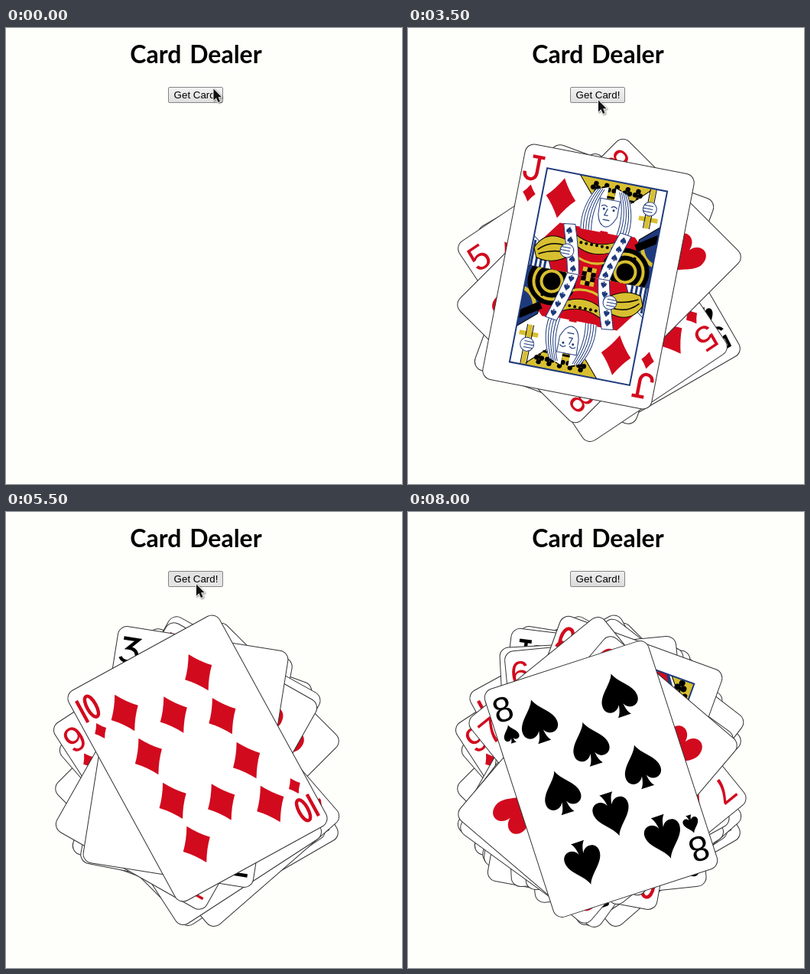
Write an HTML page with a canvas that moves like this. It is 518 by 596 pixels and loops after 8.8 s.

```html
<!DOCTYPE html>
<html lang="en">
<head>
<meta charset="utf-8">
<title>Card Dealer</title>
<style>
html, body { margin: 0; width: 100%; height: 100%; overflow: hidden; background: #fefefa; }
canvas { display: block; }
</style>
</head>
<body>
<canvas id="stage" width="518" height="596"></canvas>
<script>
const ctx = document.getElementById('stage').getContext('2d');
const LOOP = 8800, STEP = 100;
const CARD_W = 226, CARD_H = 314;
const RED = '#d20a1e', BLACK = '#000', GOLD = '#d8bf30', NAVY = '#1f3a7c', WHITE = '#fff';

// time, rank, suit, centre x, centre y, degrees
const deals = [
  [1300, '5', 'S', 263, 344, -30],
  [2200, '9', 'C', 243.5, 335, 20.2],
  [2800, '5', 'D', 241.5, 352.5, -33.8],
  [3300, '8', 'H', 250, 330.5, 45],
  [3500, 'J', 'D', 236, 325, 11],
  [3800, '4', 'D', 253, 354.5, -41],
  [4000, 'Q', 'S', 241, 324, 29],
  [4400, '9', 'D', 237.5, 351.5, -33],
  [4700, '7', 'H', 236, 332, 29.5],
  [5000, '3', 'S', 235, 320, 9],
  [5300, '10', 'D', 250.5, 322, -28.7],
  [5600, 'J', 'C', 229, 320, 7],
  [5900, 'Q', 'C', 263, 344, -6],
  [6000, 'Q', 'H', 241.5, 347, 10.5],
  [6200, 'K', 'H', 259, 328, 37.6],
  [6600, '7', 'C', 240, 328, -3],
  [6700, '6', 'D', 252.5, 328, -5.5],
  [6800, '4', 'S', 247, 354.5, 36],
  [7000, 'Q', 'D', 255, 318.5, 20],
  [7200, '7', 'D', 261, 325, -39],
  [7500, '6', 'H', 248, 350, 40.4],
  [8000, '8', 'S', 252.5, 349, -18]
];

// time, tip x, tip y
const pointer = [
  [0, 271, 79], [400, 272, 83], [600, 284, 104], [700, 298, 131],
  [800, 288, 118], [900, 263, 96], [1600, 248.5, 94],
  [6700, 226, 76], [6800, 168, 42], [6900, 112, 19], [7000, 81, 7]
];
const POINTER_GONE = 7100;
const clicks = [[1200, 1300], [3200, 4000], [4200, 5000], [5100, 5700], [5900, 6300]];

const suits = {
  S: new Path2D('M0-29C4-16 24-6 24 9C24 22 8 24 3 13C4 21 6 26 9 29H-9C-6 26-4 21-3 13C-8 24-24 22-24 9C-24-6-4-16 0-29Z'),
  H: new Path2D('M0 28C-4 14-25 2-25-12C-25-32-3-32 0-14C3-32 25-32 25-12C25 2 4 14 0 28Z'),
  D: new Path2D('M0-27Q9-11 20 0Q9 11 0 27Q-9 11-20 0Q-9-11 0-27Z'),
  C: clubPath()
};
const letters = {
  3: 'M-10-15H9L-2-3C14-4 14 16-1 15Q-8 15-11 10',
  10: 'M-9-16V16M5-15C13-15 13 15 5 15C-3 15-3-15 5-15',
  J: 'M-4-15H12M5-15V6C5 18-11 18-11 6',
  Q: 'M0-15C10-15 10 14 0 14C-10 14-10-15 0-15M-9 13Q-6 0 1 8T10 14',
  K: 'M-8-15V15M-13-15H-3M-13 15H-3M9-15L-8 4M-3-1L9 15M4-15H13M4 15H13'
};
for (const k in letters) letters[k] = new Path2D(letters[k]);

// pip heights: both side columns, then the middle column
const sides = { 4: [98], 5: [98], 6: [98, 0], 7: [98, 0], 8: [98, 0], 9: [98, 33], 10: [98, 33] };
const middle = { 3: [-98, 0, 98], 5: [0], 7: [-49], 8: [-49, 49], 9: [-3], 10: [-65, 65] };

function clubPath() {
  const p = new Path2D('M0-6C1 12 4 24 8 29H-8C-4 24-1 12 0-6Z');
  for (const [x, y] of [[0, -15], [-14, 7], [14, 7]]) {
    p.moveTo(x + 13.5, y);
    p.arc(x, y, 13.5, 0, 7);
  }
  return p;
}

function place(x, y, angle, scale, draw) {
  ctx.save();
  ctx.translate(x, y);
  ctx.rotate(angle);
  ctx.scale(scale, scale);
  draw();
  ctx.restore();
}

const bothWays = draw => [0, Math.PI].forEach(a => place(0, 0, a, 1, draw));
const ink = suit => 'HD'.includes(suit) ? RED : BLACK;
const isCourt = rank => 'JQK'.includes(rank);

function pip(suit, x, y, scale = 1, color = ink(suit)) {
  place(x, y, y > 0 ? Math.PI : 0, scale, () => {
    ctx.fillStyle = color;
    ctx.fill(suits[suit]);
  });
}

function shape(color, d, edge) {
  const p = new Path2D(d);
  ctx.fillStyle = color;
  ctx.fill(p);
  if (edge) { ctx.strokeStyle = edge; ctx.lineWidth = 1; ctx.stroke(p); }
}

function line(color, width, d) {
  ctx.strokeStyle = color;
  ctx.lineWidth = width;
  ctx.stroke(new Path2D(d));
}

function dot(color, x, y, r, edge) {
  ctx.beginPath();
  ctx.arc(x, y, r, 0, 7);
  ctx.fillStyle = color;
  ctx.fill();
  if (edge) { ctx.strokeStyle = edge; ctx.lineWidth = 1; ctx.stroke(); }
}

function rings(x, y, r, ...colors) {
  colors.forEach((c, i) => dot(c, x, y, r - i * 5, BLACK));
}

function dots(color, r, n, x, y, dx, dy) {
  for (let i = 0; i < n; i++) dot(color, x + i * dx, y + i * dy, r);
}

function face(x, y) {
  shape(WHITE, `M${x - 13} ${y - 16}H${x + 13}V${y + 5}Q${x + 7} ${y + 20} ${x} ${y + 20}Q${x - 9} ${y + 19} ${x - 12} ${y + 5}Z`, NAVY);
  line(NAVY, 1.2, `M${x - 10} ${y - 6}q4-4 8 0M${x + 3} ${y - 6}q4-4 8 0M${x - 1} ${y - 4}l-3 9h5M${x - 5} ${y + 11}h9`);
  dot(NAVY, x - 6, y - 3, 1.5);
  dot(NAVY, x + 7, y - 3, 1.5);
}

function hair(x, y, side) {
  shape(WHITE, `M${x} ${y - 32}L${x + side * 16} ${y - 26}Q${x + side * 34} ${y} ${x + side * 27} ${y + 28}H${x}Z`);
  for (let i = 0; i < 5; i++) {
    const d = side * (12 + i * 3.5);
    line(NAVY, 1, `M${x + side * (5 + i * 2.5)} ${y - 28}Q${x + d + side * 5} ${y} ${x + d} ${y + 28}`);
  }
}

function flower(x, y, core) {
  line(BLACK, 2.5, `M${x} ${y}Q${x + 4} ${y + 18} ${x + 4} ${y + 34}`);
  for (let a = 0; a < 4; a++)
    dot(GOLD, x + 7 * Math.cos(a * 1.57 + .8), y + 7 * Math.sin(a * 1.57 + .8), 6, BLACK);
  dot(core, x, y, 4, BLACK);
}

function hand(x, y) {
  dot(WHITE, x, y, 9, NAVY);
  line(NAVY, 1, `M${x - 8} ${y - 4}h12m-13 4h13m-12 4h12`);
}

function darkQueen() {
  shape(NAVY, 'M-81 0V-22L-15-65L20-75L62-58L81-30V0Z');
  shape(RED, 'M-30-50L5-78L18-12L34-10L62-62L74-34L81 0H-12Z', BLACK);
  line(WHITE, 2.5, 'M-10-60q-12 10 0 17t2 17t9 14M62-52q-12 8-3 16t-8 20M4-66q-8 8 0 16t2 16');
  shape(GOLD, 'M8-80L30-62L58-74L62-28L28-12Z', BLACK);
  line(BLACK, 2.5, 'M14-72L34-22L58-66M20-64L35-36L52-58M28-56H45');
  dots(BLACK, 1.5, 6, 17, -52, 3, 6);
  shape(GOLD, 'M-28-130H26L12-90L-28-108Z', BLACK);
  pip('C', -6, -120, .26, BLACK);
  pip('C', 10, -111, .26, BLACK);
  shape(BLACK, 'M-30-108L18-84L14-70L-28-94Z');
  line(RED, 5, 'M-27-91L12-70');
  hair(38, -98, 1);
  hair(34, -98, -1);
  face(35, -98);
  shape(WHITE, 'M-62-26L-12-38L2-4H-55Z', BLACK);
  for (let i = 0; i < 8; i++) pip('C', -46 + (i % 4) * 13, -24 + (i >> 2) * 12, .16, NAVY);
  line(GOLD, 6, 'M-14-40L4-4');
  flower(-63, -55, RED);
  hand(-49, -20);
  shape(GOLD, 'M68-108l7 12-4 12 2 72h-6l1-72-6-12Z', BLACK);
  dot(RED, 69, -96, 4, BLACK);
  dot(GOLD, 70, -40, 6, BLACK);
  shape(BLACK, 'M-36-9H60V0H-36Z');
  line(WHITE, 4, 'M-32-1H34');
  dot(GOLD, -42, -1, 8, BLACK);
}

function lightQueen() {
  shape(BLACK, 'M-32-36Q-38-94 8-124L34-60L60-50L20 0L-40 20Z');
  shape(NAVY, 'M-81 36V-4L-66-22L-20-30V10ZM58-58L81-40V-30L50-20Z');
  shape(RED, 'M24-130H42L81-76V-46L64-54Z', BLACK);
  line(NAVY, 4, 'M44-128L82-74');
  shape(GOLD, 'M48-130H81V-90Z', BLACK);
  pip('C', 65, -120, .3, BLACK);
  pip('C', 74, -106, .24, BLACK);
  hair(17, -98, 1);
  hair(12, -98, -1);
  face(15, -98);
  rings(42, -18, 30, WHITE, NAVY, WHITE, RED);
  shape(RED, 'M-20-34Q6-22 28-36L16-7L-22 10Z', BLACK);
  line(BLACK, 5, 'M-20-22H2M16-24H28M-20-8H2');
  line(GOLD, 6, 'M6-34V-3');
  line(WHITE, 2, 'M-20-15H1M-20-1H1');
  shape(GOLD, 'M-14-70Q12-55 46-72L64-52Q20-18-30-44Z', BLACK);
  for (let r = 0; r < 3; r++)
    for (let i = 0; i < 8; i++) {
      const u = (i - 3.5) / 4;
      shape(BLACK, `M${17 + u * (34 + r * 5)} ${-58 + r * 8 - u * u * (6 + r * 2)}h5v5h-5Z`);
    }
  shape(BLACK, 'M-78 5L-34-45L-18-20L-66 34Z', GOLD);
  line(GOLD, 3, 'M-72 6L-35-37L-25-20L-65 26Z');
  dots(GOLD, 4, 4, -63, 8, 9.5, -10);
  dots(GOLD, 2, 4, -55, 13, 9.5, -10);
  flower(-61, -60, GOLD);
  hand(-64, -32);
}

function king(beard) {
  shape(RED, 'M-50-62H50L81-30V0H-81V-20Z');
  shape(WHITE, 'M-81-40L-62-26L-50 0H-81Z', NAVY);
  line(NAVY, 3, 'M-77-34V0M-71-29V0M-65-24V0M-59-16V0');
  shape(GOLD, 'M-77-24Q-66-50-38-42L-32-20Q-52-6-72-12Z', BLACK);
  line(BLACK, 1.5, 'M-72-22Q-58-38-36-34M-70-17Q-54-26-34-26');
  shape(NAVY, 'M81-82L56-60L52 0H81Z', BLACK);
  line(GOLD, 5, 'M81-30Q66-34 62-50');
  line(BLACK, 10, 'M54-48L81-66');
  rings(46, -15, 31, BLACK, GOLD, BLACK, GOLD, BLACK);
  dots(BLACK, 2, 5, 28, -30, 9, -1.5);
  shape(GOLD, 'M-32-54Q0-34 32-54V-42Q0-20-28-40Z', BLACK);
  dots(BLACK, 2, 8, -25, -42, 7, 0);
  line(GOLD, 3, 'M-26-26Q0-10 26-26');
  shape(GOLD, 'M-36-129H62L36-104H-14Z', BLACK);
  for (let i = 0; i < 5; i++) pip('C', -13 + i * 14, -118, .24, BLACK);
  line(BLACK, 3, 'M-16-107H40');
  hair(14, -88, 1);
  hair(4, -88, -1);
  face(9, -88);
  if (beard) {
    shape(WHITE, 'M-9-82Q8-70 26-82L34-54Q18-40 8-48Q-6-38-18-52Z', NAVY);
    for (let i = 0; i < 7; i++) line(NAVY, 1, `M${-6 + i * 5}-74q-7 10 ${-3 + i} 24`);
    line(NAVY, 2, 'M-3-79q12 7 24 0');
  }
  for (const s of [-1, 1]) {
    shape(WHITE, `M${s * 45}-62Q${s * 33}-24 ${s * 28} 0H${s * 13}Q${s * 18}-30 ${s * 30}-64Z`, NAVY);
    for (let i = 0; i < 5; i++) pip('S', s * (36 - i * 3.6), -55 + i * 12, .16, NAVY);
  }
  for (let i = 0; i < 6; i++)
    shape(i % 2 ? BLACK : GOLD, `M${-9 + (i % 3) * 6} ${i > 2 ? -6 : -12}h6v6h-6Z`);
  line(GOLD, 6, 'M62-128V-76M50-88H75');
  line(BLACK, 1, 'M58-128V-76M66-128V-76');
  hand(62, -102);
  hand(-34, -28);
}

function court(rank, suit) {
  const queen = rank === 'Q', dark = 'SC'.includes(suit);
  const slant = queen && !dark ? 36 : 0;
  bothWays(() => {
    ctx.save();
    ctx.clip(new Path2D(`M-80-129H80V${-slant}L-80 ${slant}Z`));
    if (!queen) king(rank === 'K');
    else if (dark) darkQueen();
    else lightQueen();
    pip(suit, -55, -94, .98);
    ctx.restore();
  });
  ctx.strokeStyle = NAVY;
  ctx.lineWidth = 2;
  ctx.strokeRect(-80, -129, 160, 258);
}

function corner(rank, suit) {
  const x = isCourt(rank) ? -97 : -94;
  ctx.fillStyle = ctx.strokeStyle = ink(suit);
  if (letters[rank]) {
    ctx.lineWidth = 4.4;
    place(x, -126, 0, 1, () => ctx.stroke(letters[rank]));
  } else {
    ctx.font = '46px "Liberation Sans", Arial, sans-serif';
    ctx.textAlign = 'center';
    ctx.textBaseline = 'alphabetic';
    ctx.fillText(rank, x, -110.5);
  }
  pip(suit, x, -92.5, .42);
}

function card([, rank, suit, x, y, deg]) {
  place(x, y, deg * Math.PI / 180, 1, () => {
    ctx.beginPath();
    ctx.roundRect(-CARD_W / 2 + .5, -CARD_H / 2 + .5, CARD_W - 1, CARD_H - 1, 12);
    ctx.fillStyle = WHITE;
    ctx.fill();
    ctx.strokeStyle = '#333';
    ctx.lineWidth = 1;
    ctx.stroke();
    if (isCourt(rank)) {
      court(rank, suit);
    } else {
      for (const h of sides[rank] || [])
        for (const px of [-55, 55])
          for (const py of h ? [-h, h] : [0]) pip(suit, px, py);
      for (const py of middle[rank] || []) pip(suit, 0, py);
    }
    bothWays(() => corner(rank, suit));
  });
}

function header(pressed, hover) {
  ctx.fillStyle = BLACK;
  ctx.textAlign = 'center';
  ctx.textBaseline = 'alphabetic';
  ctx.font = 'bold 32px Lato, "Open Sans", sans-serif';
  ctx.wordSpacing = '3px';
  ctx.fillText('Card Dealer', 248.5, 46);
  ctx.wordSpacing = '0px';

  const g = ctx.createLinearGradient(0, 77, 0, 98);
  g.addColorStop(0, pressed ? '#e2e2e2' : hover ? '#f3f3f3' : '#f0f0f0');
  g.addColorStop(1, pressed ? '#e6e6e6' : hover ? '#dedede' : '#dadada');
  ctx.beginPath();
  ctx.roundRect(212.5, 77.5, 71, 20, 1.5);
  ctx.fillStyle = g;
  ctx.fill();
  ctx.strokeStyle = '#858585';
  ctx.lineWidth = 1;
  ctx.stroke();
  ctx.fillStyle = BLACK;
  ctx.font = '13.33px "Liberation Sans", Arial, sans-serif';
  ctx.fillText('Get Card!', 248.5, 92);
}

function arrow(x, y) {
  place(x, y, 0, 1, () => {
    const p = new Path2D('M.5.5V15.5L4 12.3L6.5 18L9 17L6.6 11.3H11Z');
    ctx.lineJoin = 'round';
    ctx.lineWidth = 2;
    ctx.strokeStyle = '#f4f4f4';
    ctx.shadowColor = 'rgba(0,0,0,.45)';
    ctx.shadowBlur = 2;
    ctx.shadowOffsetX = ctx.shadowOffsetY = 1;
    ctx.stroke(p);
    ctx.shadowColor = 'transparent';
    ctx.fillStyle = '#111';
    ctx.fill(p);
  });
}

function paint(t) {
  ctx.fillStyle = '#fefefa';
  ctx.fillRect(0, 0, 518, 596);
  const [, x, y] = pointer.filter(p => p[0] <= t).pop();
  const here = t < POINTER_GONE;
  const hover = here && x > 211 && x < 284 && y > 76 && y < 98;
  const pressed = clicks.some(([a, b]) => t >= a && t < b + STEP && (t - a) % 200 === 0);
  header(pressed, hover);
  deals.filter(d => d[0] <= t).forEach(card);
  if (here) arrow(x, y);
}

let shown = -1;
function tick() {
  const t = Math.floor(performance.now() % LOOP / STEP) * STEP;
  if (t !== shown) paint(shown = t);
  requestAnimationFrame(tick);
}
tick();
</script>
</body>
</html>
```
